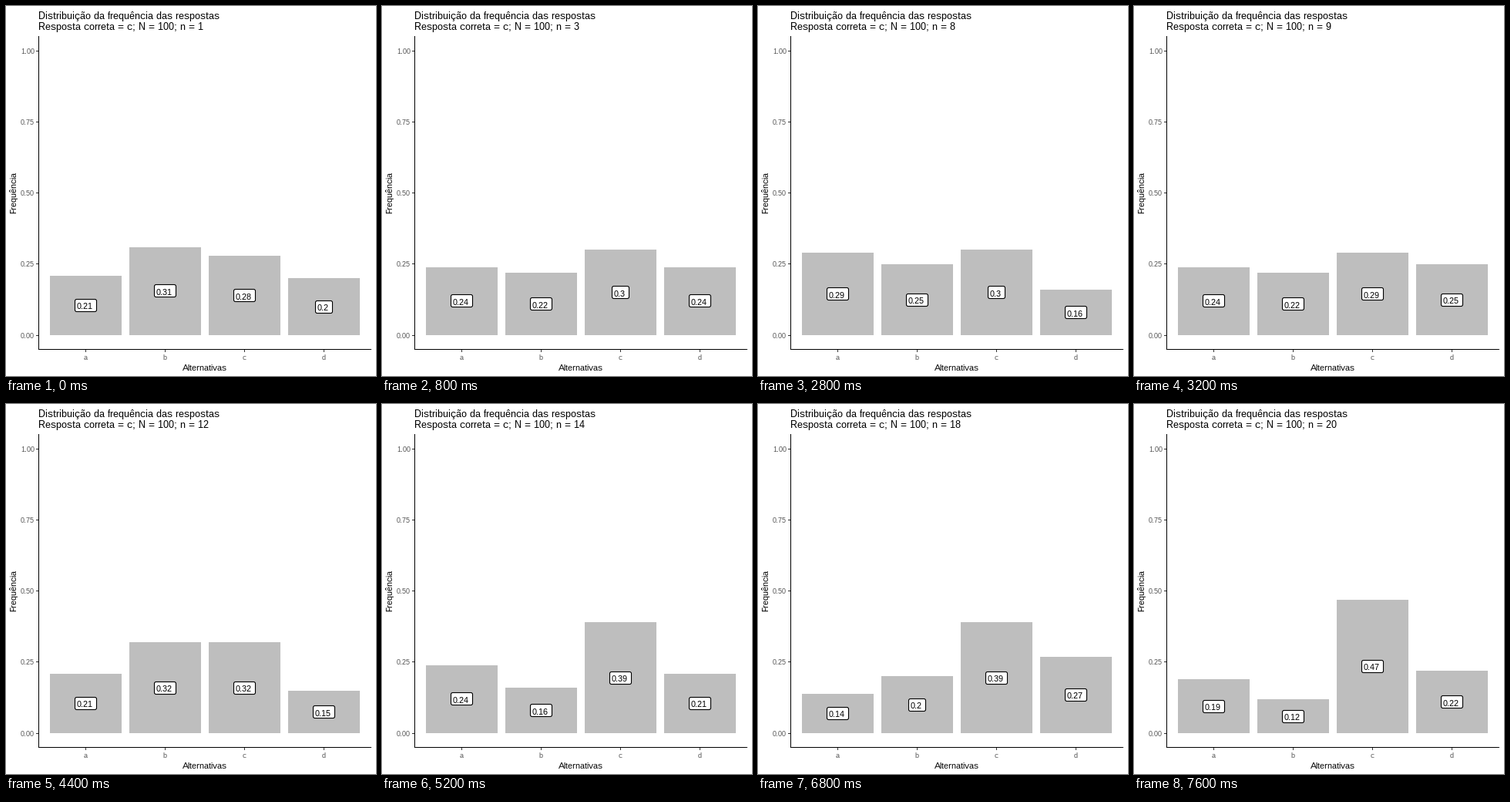
Animation, 480 px wide and 480 px high, one loop 8 s. Source, as a matplotlib script:

```python
import math

import matplotlib.pyplot as plt
from matplotlib.animation import FuncAnimation
from matplotlib.patches import FancyBboxPatch, Rectangle

plt.rcParams.update({
    "font.family": "Liberation Sans",
    "text.hinting": "native",
    "text.hinting_factor": 1,
})

SIZE = 480
ZERO_Y, UNIT = 427.2, 369.2
BAR_X, BAR_STEP, BAR_W = 57, 103, 93

# Percentages of answers a, b and c in each sample; d takes the rest of 100.
SAMPLES = [
    (21, 31, 28), (24, 26, 31), (24, 22, 30), (26, 22, 29), (24, 22, 28),
    (25, 22, 30), (27, 16, 33), (29, 25, 30), (24, 22, 29), (26, 19, 31),
    (28, 19, 32), (21, 32, 32), (25, 21, 34), (24, 16, 39), (22, 23, 36),
    (20, 21, 35), (14, 23, 38), (14, 20, 39), (17, 18, 42), (19, 12, 47),
]

fig = plt.figure(figsize=(SIZE / 100, SIZE / 100), dpi=100, facecolor="white")
ax = fig.add_axes([0, 0, 1, 1])
ax.set_xlim(0, SIZE)
ax.set_ylim(SIZE, 0)
ax.axis("off")


def block(x, y, w, h, color):
    return ax.add_patch(Rectangle((x, y), w, h, fc=color, lw=0, antialiased=False))


def write(x, y, text, px, color="black", **kw):
    return ax.text(x, y, text, fontsize=px * 0.72, color=color,
                   va=kw.pop("va", "baseline"), **kw)


def draw_axes():
    block(42, 39, 1, 407, "black")
    block(42, 445, 432, 1, "black")
    for value in (0, 0.25, 0.5, 0.75, 1):
        y = math.floor(ZERO_Y - value * UNIT)
        block(39, y, 3, 1, "#333333")
        write(37, y + 4, f"{value:.2f}", 9, "#4D4D4D", ha="right")
    for i, name in enumerate("abcd"):
        x = BAR_X + BAR_STEP * i + 46
        block(x, 446, 1, 3, "#333333")
        write(x, 459, name, 9, "#4D4D4D", ha="center")
    write(258, 473, "Alternativas", 11, ha="center")
    write(15, 242, "Frequência", 11, ha="right", va="center", rotation=90)
    write(42, 17, "Distribuição da frequência das respostas", 13)


class Bar:
    def __init__(self, index):
        self.x = BAR_X + BAR_STEP * index
        self.rect = block(self.x, ZERO_Y, BAR_W, 0, "#BEBEBE")
        self.box = ax.add_patch(FancyBboxPatch(
            (0, 0), 1, 1, boxstyle="round,pad=0,rounding_size=2.2",
            fc="white", ec="black", lw=0.8, snap=False))
        self.text = write(0, 0, "", 11)

    def set(self, value):
        top = round(ZERO_Y - value * UNIT)
        self.rect.set_y(top)
        self.rect.set_height(427 - top)
        label = f"{value:g}"
        width = 28 if len(label) == 4 else 22
        left = self.x + 46 - width // 2
        middle = ZERO_Y - value * UNIT / 2
        self.box.set_bounds(left + 0.5, math.floor(middle - 8) + 0.5, width, 16)
        self.text.set_text(label)
        self.text.set_position((left + 3, round(middle + 5)))


draw_axes()
subtitle = write(42, 31, "", 13)
bars = [Bar(i) for i in range(4)]


def update(frame):
    counts = SAMPLES[frame]
    for bar, count in zip(bars, counts + (100 - sum(counts),)):
        bar.set(count / 100)
    subtitle.set_text(f"Resposta correta = c; N = 100; n = {frame + 1}")


anim = FuncAnimation(fig, update, frames=len(SAMPLES), interval=400,
                     init_func=lambda: update(0), repeat=True, repeat_delay=0)
plt.show()
```
